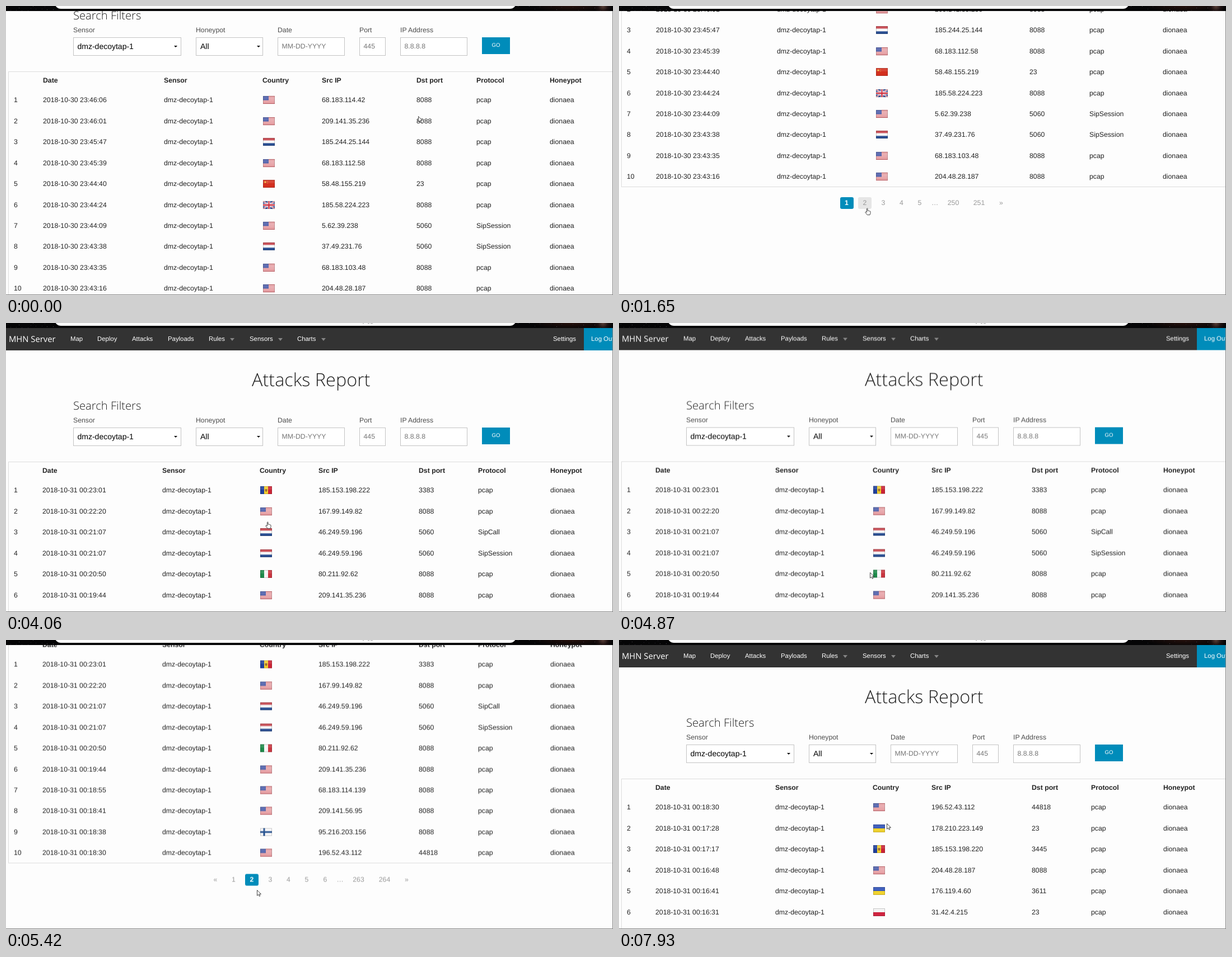
Write an HTML page that moves like this. It is 1084x517 px and loops after 8 s.

```html
<!DOCTYPE html>
<html lang="en">
<head>
<meta charset="utf-8">
<title>Attacks Report</title>
<style>
html, body { margin: 0; width: 100%; height: 100%; overflow: hidden; background: #fdfdfd; }
#stage {
  position: relative; width: 1084px; height: 517px; overflow: hidden; background: #fdfdfd;
  font: 12.25px/20px "Liberation Sans", Arial, sans-serif; color: #222;
  text-rendering: geometricPrecision;
}
#stage div, #stage svg { position: absolute; white-space: pre; box-sizing: border-box; }
.page { left: 0; top: 0; width: 1084px; height: 800px; background: #fdfdfd; will-change: transform; }
.nav { left: 0; top: 9px; width: 1084px; height: 40px; background: #333; }
.out { left: 1032px; top: 9px; width: 52px; height: 40px; background: #008cba; }
.link { color: #fff; font-size: 11.375px; }
.brand { color: #fff; font: 14.8px/20px "Open Sans", sans-serif; }
.title { font: 300 32.4px/44px "Open Sans", sans-serif; }
.sub { font: 300 20.2px/28px "Open Sans", sans-serif; }
.label { color: #4d4d4d; }
.field { border: 1px solid #c4c4c4; background: #fff; height: 33px; top: 187px; }
.pick { color: #000; font-size: 14px; }
.hint { color: #757575; }
.go { left: 850px; top: 187px; width: 50px; height: 30px; background: #008cba; color: #fff; font-size: 9.6px; line-height: 29px; text-align: center; }
.tri { width: 0; height: 0; border: solid transparent; border-bottom: 0; }
.table { left: 4px; top: 248px; width: 1100px; height: 407px; border: 1px solid #ddd; }
.head { font-weight: bold; }
.item { height: 21px; line-height: 21px; text-align: center; color: #999; border-radius: 3px; }
.now { background: #008cba; color: #fff; font-weight: bold; }
.hover { background: #e6e6e6; }
.focus { background: #e6e6e6; border-radius: 0; outline: 1px dotted #aaa; }
.strip {
  left: 0; top: 0; width: 1084px; height: 9px; overflow: hidden;
  background: radial-gradient(circle at 1066px 0, #5a4038 0, #1c1010 9px, transparent 16px),
    radial-gradient(ellipse 70px 12px at 1010px 0, #25100c, transparent), #050506;
}
.pill { left: 87px; top: -20px; width: 824px; height: 25px; border-radius: 11px; background: #fff; }
.edge { left: 0; top: 0; width: 1084px; height: 517px; border: solid #858585; border-width: 0 1px 1px 0; clip-path: inset(9px 0 0 0); }
</style>
</head>
<body>
<div id="stage"></div>
<script>
const stage = document.getElementById('stage');
const SENSOR = 'dmz-decoytap-1';

function add(parent, cls, css = {}, text = '') {
  const el = document.createElement('div');
  el.className = cls;
  el.textContent = text;
  for (const k in css) el.style[k] = typeof css[k] === 'number' ? css[k] + 'px' : css[k];
  parent.append(el);
  return el;
}

// Text starting at x, vertically centred on y
const put = (p, cls, x, y, text, half = 10) => add(p, cls, { left: x, top: y - half }, text);

function tri(p, x, y, w, h, color) {
  add(p, 'tri', { left: x - w / 2, top: y, borderWidth: `${h}px ${w / 2}px 0`, borderTopColor: color });
}

function svg(parent, w, h, body) {
  const el = document.createElementNS('http://www.w3.org/2000/svg', 'svg');
  el.setAttribute('width', w);
  el.setAttribute('height', h);
  el.innerHTML = body;
  parent.append(el);
  return el;
}

const rect = (x, y, w, h, c) => `<rect x="${x}" y="${y}" width="${w}" height="${h}" fill="${c}"/>`;
const path = (d, c, w) => `<path d="${d}" stroke="${c}" stroke-width="${w}" fill="none"/>`;
const bars = (...c) => c.map((v, i) => rect(0, i * 14 / c.length, 21, 14 / c.length, v)).join('');
const cols = (...c) => c.map((v, i) => rect(i * 7, 0, 7, 14, v)).join('');
const stripes = Array.from({ length: 13 }, (_, i) => i % 2 ? '#f4e6e6' : '#d03a44');

const flags = {
  us: bars(...stripes) + rect(0, 0, 10, 7.5, '#4254a4') +
    [1.5, 3.7, 5.9].map(y => `<path d="M1 ${y}H9.5" stroke="#8590c8" stroke-width=".8" stroke-dasharray="1 1"/>`).join(''),
  nl: bars('#c4404a', '#f7f7f7', '#2b4f92'),
  cn: rect(0, 0, 21, 14, '#d3301f') + '<circle cx="4" cy="4" r="1.6" fill="#f5c83a"/><circle cx="8" cy="3" r=".6" fill="#f5c83a"/><circle cx="8" cy="6" r=".6" fill="#f5c83a"/>',
  gb: rect(0, 0, 21, 14, '#2f4a94') + path('M0 0L21 14M21 0L0 14', '#f4f4f8', 2.6) + path('M0 0L21 14M21 0L0 14', '#cf3c4a', 1) +
    path('M10.5 0V14M0 7H21', '#f8f8fa', 4.4) + path('M10.5 0V14M0 7H21', '#cf2f3e', 2.4),
  md: cols('#1f3f9c', '#f3cf2c', '#cb2436') + '<path d="M8.5 5h4v3l-2 2.500-2-2.500z" fill="#9a6a35"/>',
  it: cols('#1e8a4a', '#f6f6f6', '#c93640'),
  fi: rect(0, 0, 21, 14, '#f6f6f8') + path('M7 0V14M0 7H21', '#25518f', 3),
  ua: bars('#2c4fb5', '#f0d22e'),
  pl: bars('#f3f3f3', '#cf2440')
};

function flag(p, x, y, code) {
  const el = svg(p, 21, 14, flags[code] + rect(0, 0, 21, 6, 'rgba(255,255,255,.1)') +
    '<rect x=".5" y=".5" width="20" height="13" fill="none" stroke="#000" stroke-opacity=".18"/>');
  el.style.left = x + 'px';
  el.style.top = Math.round(y - 7) + 'px';
}

// time, flag, source, port, protocol (pcap when absent)
const data = [
  ['2018-10-30', `23:46:06 us 68.183.114.42 8088
23:46:01 us 209.141.35.236 8088
23:45:47 nl 185.244.25.144 8088
23:45:39 us 68.183.112.58 8088
23:44:40 cn 58.48.155.219 23
23:44:24 gb 185.58.224.223 8088
23:44:09 us 5.62.39.238 5060 SipSession
23:43:38 nl 37.49.231.76 5060 SipSession
23:43:35 us 68.183.103.48 8088
23:43:16 us 204.48.28.187 8088`],
  ['2018-10-31', `00:23:01 md 185.153.198.222 3383
00:22:20 us 167.99.149.82 8088
00:21:07 nl 46.249.59.196 5060 SipCall
00:21:07 nl 46.249.59.196 5060 SipSession
00:20:50 it 80.211.92.62 8088
00:19:44 us 209.141.35.236 8088
00:18:55 us 68.183.114.139 8088
00:18:41 us 209.141.56.95 8088
00:18:38 fi 95.216.203.156 8088
00:18:30 us 196.52.43.112 44818`],
  ['2018-10-31', `00:18:30 us 196.52.43.112 44818
00:17:28 ua 178.210.223.149 23
00:17:17 md 185.153.198.220 3445
00:16:48 us 204.48.28.187 8088
00:16:41 ua 176.119.4.60 3611
00:16:31 pl 31.42.4.215 23`]
];
const wide = [65, 279, 453, 558, 737, 843, 972];
const columns = [[66, 282, 458, 564, 733, 840, 971], wide, wide];
const titles = ['Date', 'Sensor', 'Country', 'Src IP', 'Dst port', 'Protocol', 'Honeypot'];

// Pagination: label and centre
const pagers = [
  [['1', 406.5], ['2', 439], ['3', 472], ['4', 504.5], ['5', 537], ['…', 564], ['250', 597], ['251', 643], ['»', 682.5]],
  [['«', 374], ['1', 406.5], ['2', 439], ['3', 472], ['4', 504.5], ['5', 537], ['6', 570], ['…', 596.5], ['263', 629.5], ['264', 676], ['»', 715.5]],
  []
];

function addTop(p) {
  add(p, 'nav');
  add(p, 'out');
  put(p, 'brand', 5, 29, 'MHN Server');
  [['Map', 115], ['Deploy', 163], ['Attacks', 225], ['Payloads', 289], ['Rules', 362],
    ['Sensors', 435], ['Charts', 520], ['Settings', 977], ['Log Out', 1045]]
    .forEach(([s, x]) => put(p, 'link', x, 29, s));
  [404, 490, 567].forEach(x => tri(p, x, 27, 9, 5, '#858585'));
  put(p, 'title', 439, 101, 'Attacks Report', 22);
  put(p, 'sub', 120, 147, 'Search Filters', 14);
  [['Sensor', 120], ['Honeypot', 339], ['Date', 485], ['Port', 631], ['IP Address', 704]]
    .forEach(([s, x]) => put(p, 'label', x, 174, s));
  [[120, 193], [339, 120], [485, 120], [631, 47], [704, 120]]
    .forEach(([left, width]) => add(p, 'field', { left, width }));
  put(p, 'pick', 127.5, 203, SENSOR);
  put(p, 'pick', 347, 203, 'All');
  [303, 451].forEach(x => tri(p, x, 202, 6, 3, '#000'));
  [['MM-DD-YYYY', 492.5], ['445', 638.5], ['8.8.8.8', 711.5]]
    .forEach(([s, x]) => put(p, 'hint', x, 203, s));
  add(p, 'go', {}, 'GO');
}

const pages = data.map(([day, rows], n) => {
  const p = add(stage, 'page');
  const x = columns[n];
  addTop(p);
  add(p, 'table');
  titles.forEach((s, i) => put(p, 'head', x[i], 264, s));
  rows.split('\n').forEach((row, i) => {
    const [time, code, ip, port, proto = 'pcap'] = row.split(' ');
    const y = 299.3 + i * 37.45;
    put(p, '', 14, y, String(i + 1));
    [`${day} ${time}`, SENSOR, '', ip, port, proto, 'dionaea']
      .forEach((s, k) => s && put(p, '', x[k], y, s));
    flag(p, x[2] + .5, y, code);
  });
  const items = {};
  for (const [s, c] of pagers[n]) {
    const width = s.length > 1 ? 38 : 24;
    const cls = s === String(n + 1) ? 'item now' : 'item';
    items[s] = add(p, cls, { left: c - width / 2, top: n ? 674 : 673, width }, s);
  }
  return { p, items };
});

const strip = add(stage, 'strip');
for (let i = 0; i < 26; i++) {
  const r = i * .618 % 1;
  const left = Math.round(i % 2 ? r * 86 : 914 + r * 165);
  add(strip, '', { left, top: i * 5 % 9, width: 1, height: 1, background: i % 3 ? '#292530' : '#4a4550' });
}
add(strip, 'pill');
const mark = add(strip, '');
[[637, 2], [646, 3], [651, 4]].forEach(([left, width]) =>
  add(mark, '', { left, top: 0, width, height: 1, background: '#aaa' }));
add(stage, 'edge');

const cursors = {
  arrow: svg(stage, 12, 16, '<path d="M.5.5V10.300L2.800 8.200 4.300 11.500 5.900 10.800 4.400 7.600H7.500Z" fill="#fff" stroke="#333" stroke-width=".9"/>'),
  hand: svg(stage, 13, 15, '<path d="M3.500 8V1.500Q4.300.2 5.100 1.500V5.200Q6.100 4.500 6.800 5.500 7.800 4.900 8.500 6 10 5.600 10 7.200V9.500L9 12.700H4.400L1 8.500Q.7 6.800 2.200 7.100Z" fill="#fff" stroke="#333" stroke-width=".9"/>')
};

// start, page, scroll, cursor, x, y, hovered item, focused item
const steps = [
  [0, 0, 131, 'arrow', 736, 197],
  [150, 0, 246, 'arrow', 736, 197],
  [860, 0, 331, 'arrow', 736, 233],
  [1650, 0, 331, 'hand', 439, 361, '2'],
  [2330, 0, 331, 'hand', 442, 357, '2'],
  [2470, 0, 331, 'hand', 462, 355, '3', '2'],
  [2680, 0, 331, 'hand', 463, 355, '3', '2'],
  [4060, 1, 0, 'hand', 463, 355],
  [4440, 1, 0, 'arrow', 465, 397],
  [4740, 1, 0, 'arrow', 448, 446],
  [4870, 1, .5, 'arrow', 448, 446],
  [5000, 1, 131, 'arrow', 448, 446],
  [5420, 1, 255.5, 'arrow', 448, 447],
  [5650, 1, 256, 'arrow', 457, 439],
  [5840, 1, 256, 'hand', 463, 427, '3'],
  [6120, 1, 256, 'hand', 475, 428, '3'],
  [6420, 1, 256, 'hand', 478, 427, '3'],
  [6730, 1, 256, 'arrow', 480, 398, '3'],
  [6880, 1, 256, 'arrow', 480, 323, '', '3'],
  [7930, 2, 0, 'arrow', 478, 328]
];

const begin = performance.now();
function draw(now) {
  const t = Math.max(0, now - begin) % 8000;
  const [, page, scroll, kind, x, y, hover, focus] = steps.findLast(s => s[0] <= t);
  pages.forEach(({ p, items }, i) => {
    p.style.display = i === page ? 'block' : 'none';
    p.style.transform = `translateY(${-scroll}px)`;
    for (const s of ['2', '3']) {
      if (!items[s]) continue;
      items[s].classList.toggle('hover', s === hover);
      items[s].classList.toggle('focus', s === focus);
    }
  });
  for (const k in cursors) {
    cursors[k].style.display = k === kind ? 'block' : 'none';
    cursors[k].style.left = x + 'px';
    cursors[k].style.top = y + 'px';
  }
  mark.style.display = t >= 3530 ? 'block' : 'none';
  requestAnimationFrame(draw);
}
draw(begin);
</script>
</body>
</html>
```
